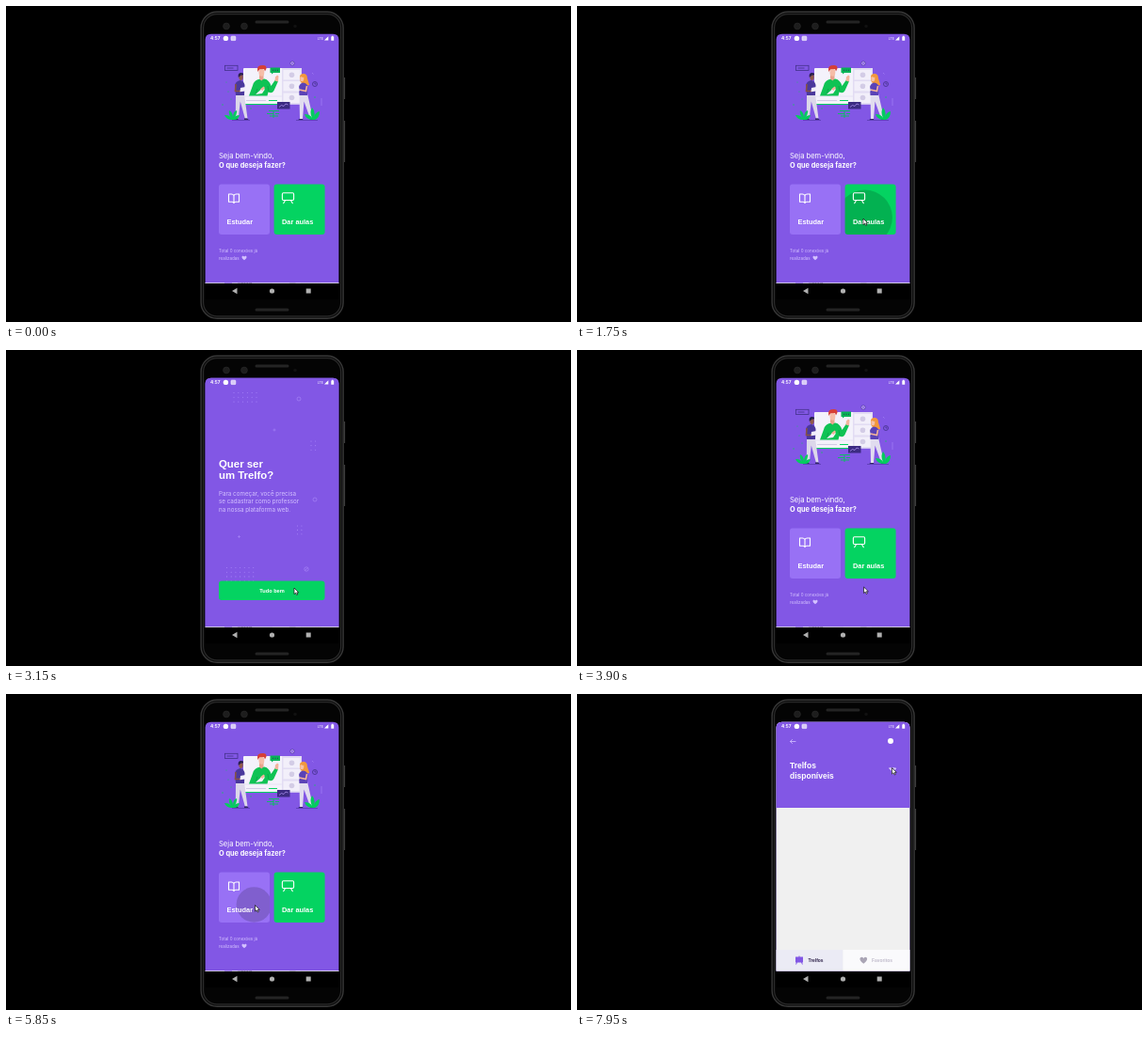
Recreate the animation shown at these times as an HTML page. Size 600x336 px, loop 8000 ms.

```html
<!DOCTYPE html>
<html lang="pt-BR">
<head>
<meta charset="utf-8">
<title>App de aulas</title>
<style>
  html, body { margin: 0; width: 100%; height: 100%; overflow: hidden; background: #000; }
  svg { display: block; width: 600px; height: 336px; }
  text { font-family: "Liberation Sans", Arial, sans-serif; font-weight: 700; fill: #fff; }
  .round { font-family: Inter, "Open Sans", sans-serif; font-weight: 400; }
  .bold { font-weight: 700; }
  .soft { fill: #d4c2ff; }
  .line { fill: none; stroke: #fff; stroke-width: 1.1; stroke-linejoin: round; stroke-linecap: round; }
  .ink { fill: none; stroke: #43318a; stroke-width: .8; }
  .decor { fill: none; stroke: #a583f7; stroke-width: .7; }
  .dots { fill: #a583f7; }
</style>
</head>
<body>
<svg viewBox="0 0 600 336">
  <defs>
    <clipPath id="screenClip"><path d="M211.6 294.5V35.7q0-6 6-6H347.4q6 0 6 6V294.5z"/></clipPath>
    <clipPath id="teachClip"><rect x="211" y="30" width="143" height="265"/></clipPath>
    <clipPath id="studyClip"><rect x="211" y="30" width="143" height="265"/></clipPath>
    <clipPath id="learnClip"><rect x="226" y="189.5" width="54" height="53.5" rx="3"/></clipPath>
    <clipPath id="giveClip"><rect x="284.6" y="189.5" width="54" height="53.5" rx="3"/></clipPath>
    <clipPath id="okClip"><rect x="226" y="245.5" width="112.5" height="20.5" rx="3"/></clipPath>
    <path id="heart" d="M0 3.6C-5.6-.2-4-3.4-2-3.4Q-.6-3.4 0-2 .6-3.4 2-3.4C4-3.4 5.6-.2 0 3.6z"/>
  </defs>

  <rect width="600" height="336"/>

  <!-- phone body -->
  <path d="M359.5 76v23M359.5 122v44" stroke="#3c3c3c" stroke-width="1.2"/>
  <rect x="207.1" y="6.2" width="151" height="326" rx="17" fill="#0a0a0a" stroke="#383838" stroke-width="1.4"/>
  <rect x="209.6" y="8.6" width="146" height="321.2" rx="14.5" fill="#040404" stroke="#2a2a2a" stroke-width="1.2"/>
  <path d="M266 17h33M266 323h33" stroke="#242424" stroke-width="3" stroke-linecap="round"/>
  <g fill="#1d1d1d" stroke="#292929" stroke-width=".7">
    <circle cx="234" cy="21.5" r="3.4"/><circle cx="253" cy="21.5" r="3.4"/>
    <circle cx="307" cy="21.5" r="1.8" fill="#111" stroke="none"/>
  </g>
  <rect x="211.6" y="294" width="141.8" height="18"/>
  <g fill="#b0b0b0">
    <path d="M240 303l5.5-3.2v6.4z"/><circle cx="282.5" cy="303" r="2.6"/><rect x="318.7" y="300.5" width="5" height="5"/>
  </g>

  <g clip-path="url(#screenClip)">
    <rect x="211" y="29" width="143" height="266" fill="#8257e5"/>

    <!-- welcome page -->
    <g id="home">
      <g id="illustration">
        <g class="ink">
          <rect x="232.4" y="63.3" width="13.6" height="5.2"/><path d="M234.5 66h7"/>
          <circle cx="328" cy="83" r="2.5"/><path d="M328 81.5V83h1.4"/>
          <circle cx="304" cy="61" r="1.5" stroke="#d9ccf8"/><circle cx="304" cy="61" r="2.2" stroke-width=".5"/>
        </g>
        <rect x="252" y="66" width="62" height="38.5" rx="1" fill="#f4f2fb"/>
        <rect x="293" y="66" width="21" height="38.5" fill="#e2dcf3"/>
        <g fill="#f2effa">
          <rect x="294.5" y="68" width="18" height="10.5"/><rect x="294.5" y="80" width="18" height="10.5"/>
          <rect x="294.5" y="92.500" width="18" height="10.5"/>
        </g>
        <g fill="#d3cce6">
          <circle cx="303.5" cy="73.300" r="2.8"/><circle cx="303.5" cy="85.300" r="2.8"/><circle cx="303.5" cy="97.500" r="2.8"/>
        </g>
        <path d="M252 96h41" stroke="#e2dcf3" stroke-width=".8"/>
        <path d="M255 100.500h21" stroke="#d3cce6" stroke-width="1.200"/>
        <path d="M252 104.500h37M279 100.500h9" stroke="#04d361" stroke-width="1.200"/>

        <!-- presenter -->
        <path d="M258 95.500l4-11q1-5 6-6.500l6.500-.5q5 1 7 7.500l4.500-6.500 3 1.500-4.500 10q-2 3.500-6 1.500l-1 4z" fill="#0fc354"/>
        <path d="M265 94l2-6M278 85l1 6" stroke="#0a9443" stroke-width=".6"/>
        <path d="M285.500 79.500l.5-4 2-2 1.500 1-.5 6z" fill="#f3b49c"/>
        <path d="M265 94l7-6.500 3 1-3 4.500z" fill="#f4f2fb"/>
        <path d="M270 88.500l3.500-3 1.500 1.500-2.500 3z" fill="#f3b49c"/>
        <path d="M269 73h4.500v4.500l-2.200 2-2.300-2z" fill="#eaa48d"/>
        <ellipse cx="271.400" cy="70.500" rx="2.900" ry="4.300" fill="#f6bda7"/>
        <path d="M267.300 70q-1.300-6 2.700-6.700 7-1.300 6.500 3.200l-1.500 3-1-2.500-4.700.2z" fill="#d63f36"/>
        <path d="M280.500 65.500h10.500v5.500h-7l-2 1.600v-1.600h-1.500z" fill="#04b455"/>
        <path d="M283 68.300h1M285.500 68.300h1M288 68.300h1" stroke="#31305c"/>

        <!-- left learner -->
        <path d="M244 94h9l3.500 25.500h-2.700l-5-18-2 18h-3z" fill="#dcd7ea"/>
        <path d="M242.500 119.500h4v1.500h-5zM253 119.500h3.200l1.500 1.500h-4.700z" fill="#322766"/>
        <path d="M244 95l-1-11q1-4 5.500-5 4 .5 5 5l-.5 11z" fill="#4a389d"/>
        <path d="M244 83l-.5 7.500 6.500 0" fill="none" stroke="#865244" stroke-width="1.600"/>
        <ellipse cx="249.500" cy="75.500" rx="2.200" ry="3.400" fill="#90594a"/>
        <path d="M246.800 76q-1-5 3-5 2.700 0 2.200 2.300l-2.700.4z" fill="#271f4d"/>
        <path d="M249 87l5.500-1-.5 4.500-5.500.8z" fill="#f3f0fb"/>

        <!-- right learner -->
        <path d="M311.500 93h8.500l6 26.500h-3l-6.500-18-1.500 18.500h-3z" fill="#e1dcef"/>
        <path d="M311.500 120h3.700v1.300h-5.200zM323 119.500h3.200l1.800 1.500h-4.500z" fill="#322766"/>
        <path d="M312.500 80q-2-7.500 2.500-8 5-.5 5 5l2.200 7-6 1z" fill="#f2983c"/>
        <path d="M311.500 95l-.5-9q1-4 4.500-4.500 4.500.5 5 5l-.5 8.500z" fill="#5a42b6"/>
        <path d="M319.500 85l-1 5.500-7-1.500" fill="none" stroke="#f4b39a" stroke-width="1.600"/>
        <ellipse cx="314.300" cy="77" rx="2" ry="3.200" fill="#f7c1a8"/>
        <path d="M312 75q1-3 5-2l-1 3z" fill="#f2983c"/>
        <path d="M306 85l5 .8.800 4.700-5.300-.8z" fill="#f3f0fb"/>

        <rect x="288" y="102" width="13.500" height="7.500" fill="#3c2b82"/>
        <path d="M290 107.500l2.500-2 2.500 1 2-2.500 2.500 1" fill="none" stroke="#a78ced" stroke-width=".8"/>
        <path fill="#04cc5e" d="M240 121q-6 0-8-5 5-.5 7 3-3-4-2-8 4 2 4 8 0-7 4-8 1 4-3 8 2-3 6-3-1 5-6 5zM326 121q-7 0-9-6 6 0 8 4-3-6 0-11 4 4 2 11 1-6 6-7 0 7-5 9z"/>
        <path d="M279 111.500h11M277 114.500h7M286 114.500h4M280 117h9M284 112v7" fill="none" stroke="#04c65b" stroke-width=".9"/>
        <path d="M240 121.500h19M308 121.500h23" stroke="#5a3bb0" stroke-width=".8"/>
        <g fill="#14bd65">
          <circle cx="230" cy="105" r=".7"/><circle cx="236" cy="91" r=".6"/><circle cx="239" cy="99" r=".6"/>
          <circle cx="260" cy="109" r=".7"/><circle cx="328" cy="97" r=".7"/><circle cx="234" cy="81" r=".5"/>
        </g>
        <path class="decor" d="M335 98v8M325 71l1.500 1.500"/>
      </g>

      <text class="round" x="226" y="161.800" font-size="7.6">Seja bem-vindo,</text>
      <text class="round bold" x="226" y="171.800" font-size="7.35">O que deseja fazer?</text>
      <rect x="226" y="189.500" width="54" height="53.500" rx="3" fill="#9871f5"/>
      <rect x="284.600" y="189.500" width="54" height="53.500" rx="3" fill="#04d361"/>
      <g clip-path="url(#learnClip)"><circle class="ripple"/></g>
      <g clip-path="url(#giveClip)"><circle class="ripple"/></g>
      <path class="line" d="M242 201.500q-1-1.500-2.500-1.500H236.500v8.300H240q1.500 0 2 1.200.5-1.200 2-1.200h3.500V200h-3q-2 0-2.500 1.500v8"/>
      <path class="line" d="M294.600 198.700h9.800q1.200 0 1.200 1.200v5.400q0 1.200-1.200 1.200h-9.800q-1.200 0-1.200-1.200v-5.400q0-1.200 1.200-1.200zM296.500 206.800l-1.800 2.900M302.500 206.800l1.800 2.900"/>
      <text x="234.500" y="232.300" font-size="7.4">Estudar</text>
      <text x="293" y="232.300" font-size="7.4">Dar aulas</text>
      <text class="round soft" x="226" y="262.300" font-size="4.5">Total 0 conexões já</text>
      <text class="round soft" x="226" y="269.500" font-size="4.5">realizadas</text>
      <use href="#heart" transform="translate(253 268) scale(.65)" fill="#d4c2ff"/>
    </g>
    <rect id="shade" x="211" y="29" width="143" height="266" opacity="0"/>

    <!-- teacher invitation page -->
    <g clip-path="url(#teachClip)"><g id="teach">
      <rect x="211" y="18" width="143" height="280" fill="#8257e5"/>
      <g id="dotGrids" class="dots"></g>
      <g class="decor">
        <circle cx="311" cy="52" r="2"/><circle cx="328" cy="159" r="2"/><circle cx="319" cy="233" r="2.2"/>
        <path d="M283.500 85h3M285 83.500v3M246 198.500h3M247.500 197v3M317.500 234.500l3-3"/>
      </g>
      <text x="226" y="124.600" font-size="11.4">Quer ser</text>
      <text x="226" y="136.600" font-size="11.4">um Trelfo?</text>
      <g font-size="6.25">
        <text class="round soft" x="226" y="155">Para começar, você precisa</text>
        <text class="round soft" x="226" y="163.300">se cadastrar como professor</text>
        <text class="round soft" x="226" y="171.700">na nossa plataforma web.</text>
      </g>
      <rect x="226" y="245.500" width="112.500" height="20.500" rx="3" fill="#04d361"/>
      <g clip-path="url(#okClip)"><circle class="ripple"/></g>
      <text x="282.500" y="257.900" font-size="5.65" text-anchor="middle">Tudo bem</text>
    </g></g>

    <!-- list page -->
    <g clip-path="url(#studyClip)"><g id="study">
      <rect x="211" y="18" width="143" height="280" fill="#f0f0f0"/>
      <rect x="211" y="18" width="143" height="103" fill="#8257e5"/>
      <path class="line" style="stroke:#d4c2ff;stroke-width:.8" d="M232 50.500h-5.500m2-2l-2 2 2 2"/>
      <circle cx="333" cy="50" r="3" fill="#fff"/>
      <text x="226" y="79.300" font-size="8.5">Trelfos</text>
      <text x="226" y="89.800" font-size="8.5">disponíveis</text>
      <path class="line" style="stroke-width:.9" d="M332 79h6.500l-2.500 3v3l-1.500-.8v-2.200z"/>
      <rect x="211" y="272" width="71.500" height="26" fill="#ebebf5"/>
      <rect x="282.500" y="272" width="71.500" height="26" fill="#fafafc"/>
      <path d="M232 279.500h3.500v-1h1v1h3.500v6h-1l1 2h-1l-1-2h-4l-1 2h-1l1-2h-1z" fill="#8257e5"/>
      <text x="245.500" y="285.100" font-size="4.9" style="fill:#32264d">Trelfos</text>
      <use href="#heart" transform="translate(304.300 283.200)" fill="#aaa5b5"/>
      <text x="313" y="285.100" font-size="4.9" style="fill:#c1bccc">Favoritos</text>
    </g></g>

    <!-- status bar -->
    <text class="round bold" x="217" y="36.200" font-size="4.7">4:57</text>
    <circle cx="233.400" cy="34.400" r="2.7" fill="#fff"/>
    <rect x="239" y="32.200" width="4.800" height="4.400" rx=".7" fill="#d8caf8" stroke="#fff" stroke-width=".6"/>
    <text class="round" x="330.800" y="36.100" font-size="3.600">LTE</text>
    <path d="M338 36.600h4.300v-4.400z" fill="#fff"/>
    <path d="M345.300 32.400h.8v-.7h1.300v.7h.8v4.400h-2.900z" fill="#fff"/>
  </g>

  <path id="cursor" d="M0 0V6.600L1.600 5.200 2.700 7.500 3.800 7 2.800 4.800H4.800z" fill="#fff" stroke="#111" stroke-width=".7"/>
</svg>

<script>
const LOOP = 8000, TOP = 30, HEIGHT = 265, SLIDE = 425;
const find = id => document.getElementById(id);
const clamp = x => Math.min(1, Math.max(0, x));
const lerp = (a, b, x) => a + (b - a) * x;
const setAll = (el, attrs) => Object.entries(attrs).forEach(([k, v]) => el.setAttribute(k, v));

// x, y, columns, rows, gap
const grids = [[242, 45.5, 6, 3, 4.8], [324, 97, 2, 3, 4.6], [309.5, 187, 2, 3, 4.4], [234.5, 231.5, 7, 4, 4.7]];
find('dotGrids').innerHTML = grids.map(([x, y, cols, rows, gap]) =>
  Array.from({ length: cols * rows }, (_, i) =>
    `<circle cx="${x + i % cols * gap}" cy="${y + Math.floor(i / cols) * gap}" r=".55"/>`).join('')).join('');

// time, x, y of the pointer tip
const path = [[500, 203, 250], [950, 304, 226], [2300, 304, 226], [2900, 306, 253], [3700, 306, 253],
  [4300, 300.5, 249], [4800, 300.5, 249], [5600, 264.5, 224.5], [6500, 264.5, 224.5], [7700, 334.5, 78.5]];

// In the order of the ripple circles in the document
const presses = [
  { start: 5779, from: [264.8, 225], to: [253, 216], radius: 38 },
  { start: 1620, from: [304, 227], to: [312, 216], radius: 38 },
  { start: 3300, from: [306, 254], to: [282, 256], radius: 57 }
];
const ripples = document.querySelectorAll('.ripple');

function slideEase(x) {
  const curve = (s, a, b) => 3 * (1 - s) ** 2 * s * a + 3 * (1 - s) * s * s * b + s ** 3;
  let low = 0, high = 1;
  for (let i = 0; i < 18; i++) {
    const mid = (low + high) / 2;
    if (curve(mid, 0.20833, 0.25) < x) low = mid; else high = mid;
  }
  return curve(low, 0.82, 1);
}
const slideFrom = (t, start) => t < start ? 0 : t >= start + SLIDE ? 1 : slideEase((t - start) / SLIDE);

// The page is uncovered from the bottom while its content rises slightly.
function reveal(name, progress) {
  const gap = HEIGHT * (1 - progress);
  find(name + 'Clip').firstElementChild.setAttribute('y', TOP - 1 + gap);
  find(name + 'Clip').firstElementChild.setAttribute('height', HEIGHT + 1);
  find(name).setAttribute('transform', `translate(0 ${gap * 0.041})`);
}

function drawRipple(el, { start, from, to, radius }, t) {
  const age = t - start;
  const grow = 1 - (1 - clamp(age / 250)) ** 2;
  setAll(el, {
    cx: lerp(from[0], to[0], grow * 0.25), cy: lerp(from[1], to[1], grow * 0.25),
    r: radius * grow,
    opacity: age < 0 ? 0 : 0.16 * clamp((600 - age) / 350)
  });
}

function drawCursor(t) {
  const next = path.findIndex(point => point[0] > t);
  const b = path[next < 0 ? path.length - 1 : next];
  const a = next < 1 ? b : path[next - 1];
  const x = a === b ? 1 : (t - a[0]) / (b[0] - a[0]);
  const e = x * x * (3 - 2 * x);
  setAll(find('cursor'), {
    transform: `translate(${lerp(a[1], b[1], e)} ${lerp(a[2], b[2], e)})`,
    visibility: t < path[0][0] ? 'hidden' : 'visible'
  });
}

function draw() {
  const t = performance.now() % LOOP;
  const teach = slideFrom(t, 1785) - slideFrom(t, 3470);
  const study = slideFrom(t, 5950);
  const covered = Math.max(teach, study);
  reveal('teach', teach);
  reveal('study', study);
  find('home').setAttribute('transform', `translate(0 ${-0.02 * HEIGHT * covered})`);
  find('shade').setAttribute('opacity', 0.1 * clamp((covered - 0.36) / 0.64));
  presses.forEach((press, i) => drawRipple(ripples[i], press, t));
  drawCursor(t);
  requestAnimationFrame(draw);
}
draw();
</script>
</body>
</html>
```
